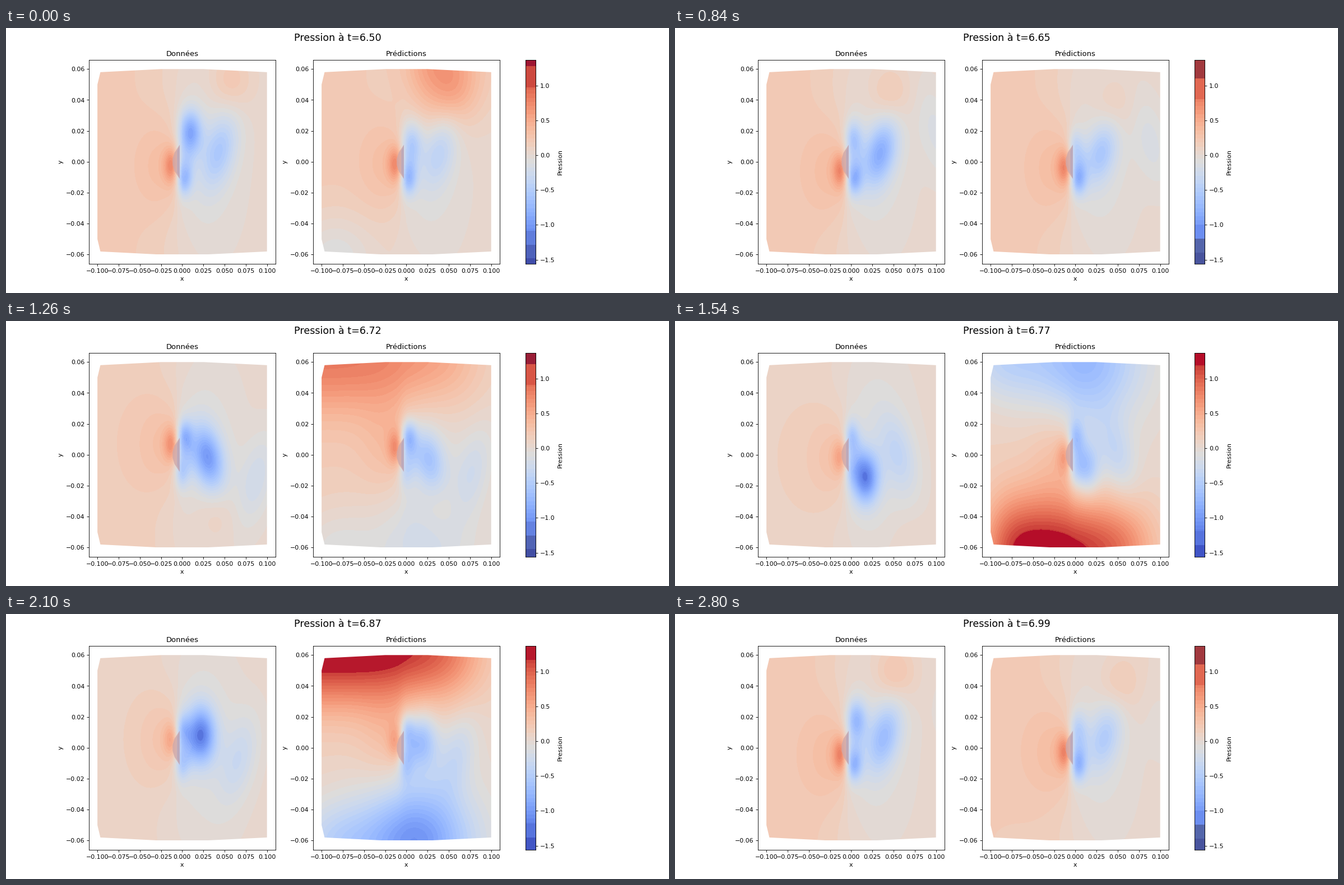
Write a matplotlib script that moves like this. It is 1183 px wide and 473 px high and loops after 2940 ms.

```python
import numpy as np
import matplotlib.pyplot as plt
from matplotlib.animation import FuncAnimation
from matplotlib.patches import Polygon

DPI = 78.86
FRAMES, STEP_MS = 21, 140
CYCLE = 6.8                 # frames per shedding period
VMIN, VMAX, STEP = -1.56, 1.37, 0.0586

X, Y = np.meshgrid(np.linspace(-.1, .1, 304), np.linspace(-.06, .06, 332))


def bump(x, y, sx, sy, ys=Y, shear=0):
    dy = ys - y
    dx = X - x + shear * dy
    return np.exp(-.5 * ((dx / sx) ** 2 + (dy / sy) ** 2))


def pulse(a, center, width):
    return np.exp(-((a - center) / width) ** 2)


def rise(v, soft):
    return 1 / (1 + np.exp(-v / soft))


def vortex(age, ys, pred):
    """Grows on the body's shoulder, is shed, then drifts off and fades."""
    s = max(age - (.87 if pred else .82), 0)
    x = -.001 + .005 * pulse(age, .4, .2) + .06 * s + .028 * s ** 5
    swing = np.cos(2 * np.pi * (max(age, .84) - 1) / .92)
    y = .003 + .010 * swing if pred else .006 + .013 * swing
    if s == 0:
        y = .0115
    young = .65 * pulse(age, .42, .3) * min(age / .15, 1)
    shed = (.55 if pred else 1.1) * pulse(age, 1.15, .28)
    tail = .25 * rise(age - 1.3, .05) * rise(1.9 - age, .03)
    shear = .35 * np.clip((age - 1.2) / .15, 0, 1)
    size = .0065 + .0085 * np.tanh(2 * s), .0075 + .0135 * s
    return -(young + shed + tail) * bump(x, y, *size, ys, shear)


def pocket(age, ys, pred):
    """High pressure left between two shed vortices."""
    d = age - .38
    y = -(.035 if pred else .043) - .07 * d
    return (.2 if pred else .27) * pulse(age, .44, .14) * bump(.045 + .1 * d, y, .018, .014, ys)


def swing_up(age):
    age = (age + .07) % 1 - .07
    return np.sin(np.pi * np.clip((age + .06) / .42, 0, 1))


def swell(age, ys):
    """Boundary error: a red front spreading upstream, blue on the far side."""
    age = (age + .07) % 1 - .07
    k = np.sqrt(swing_up(age))
    front = rise(X - .01 + .9 * age, .013) * rise(.07 - X, .02)
    red = 1.3 * k * front * np.exp(-.5 * ((ys - .062) / .025) ** 2)
    deep = 1.05 * np.sin(np.pi * np.clip(age / .38, 0, 1)) ** 2
    blue = deep * bump(.008, -.062, .048, .025, ys)
    return red - blue - .45 * k * bump(-.085, -.062, .035, .02, ys)


def field(phase, pred):
    beat = np.cos(4 * np.pi * (phase - .43))
    y0 = .0065 * np.sin(2 * np.pi * (phase - .07)) * (.65 if pred else 1)
    v = .03 + (.13 + .06 * beat) * (.5 - .5 * np.tanh(X / .05))
    v -= .17 * bump(.02, 0, .035, .05) + .2 * bump(.005, 0, .008, .009)
    front = (.48 + .1 * beat) * bump(-.012, y0, .007, .008)
    front += .25 * bump(-.018, y0, .024, .022)
    v += front * rise(-.006 - X, .0022)
    for half in (0, 1):
        ys = -Y if half else Y
        p = (phase - .5 * half) % 1
        v += vortex(p, ys, pred) + vortex(p + 1, ys, pred) + pocket(p, ys, pred)
        if pred:
            v += swell(p, ys)
    return v


def paint(v, swing):
    """Fine levels in the middle, a few flat and duller ones at the ends."""
    q = (np.floor(v / STEP) + .5) * STEP
    hi, lo = .8 + .4 * swing, -1 - .2 * swing
    q = np.where(v > hi, hi + (np.floor((v - hi) / .3) + .5) * .3, q)
    q = np.where(v < lo, lo - (np.floor((lo - v) / .2) + .5) * .2, q)
    q = np.clip(q, VMIN, VMAX)
    rgb = plt.cm.coolwarm((q - VMIN) / (VMAX - VMIN))[..., :3]
    dull = .4 * (1 - swing) * np.clip((np.abs(q) - 1.1) / .2, 0, 1)[..., None]
    return rgb * (1 - dull) + dull * np.array([.33, .33, .37])


fig = plt.figure(figsize=(1183.01 / DPI, 473.01 / DPI), dpi=DPI)
title = fig.suptitle("", fontsize=16)


def mirrored(points):
    return points + [(x, -y) for x, y in points[::-1]]


outline = mirrored([(-.1, .05), (-.0965, .058), (-.025, .06), (.025, .06), (.1, .058)])
body = mirrored([(-.003, .011), (-.009, .006), (-.0113, .002)])
edge = mirrored([(-.003, .011), (-.006, .007)])
wake = [(0, .012), (.012, .001), (.001, -.011)]


def fmt(digits):
    return lambda v, _: f"{v:.{digits}f}".replace("-", "\u2212")


def picture(ax, shape, extent):
    return ax.imshow(np.ones(shape + (3,)), extent=extent, origin="lower",
                     aspect="auto", interpolation="nearest")


def panel(x0, name, pred):
    ax = fig.add_axes([x0 / 1183, .11, 332.8 / 1183, .77])
    im = picture(ax, X.shape, (-.1, .1, -.06, .06))
    im.set_clip_path(Polygon(outline, transform=ax.transData))
    if not pred:
        ax.add_patch(Polygon(wake, fc="#bccdfa", alpha=.15, lw=0))
    ax.add_patch(Polygon(body, fc="#d0a8a8", alpha=.8, lw=0))
    ax.add_patch(Polygon(edge, fc="#a5a0c3", alpha=.45, lw=0))
    ax.set(xlim=(-.11, .11), ylim=(-.066, .066), xlabel="x", ylabel="y", title=name)
    ax.set_xticks(np.arange(-4, 5) * .025)
    ax.set_yticks(np.arange(-3, 4) * .02)
    ax.xaxis.set_major_formatter(fmt(3))
    ax.yaxis.set_major_formatter(fmt(2))
    return im


left_im = panel(148, "Données", False)
right_im = panel(548, "Prédictions", True)

bar = fig.add_axes([927.4 / 1183, .11, 18 / 1183, .77])
scale = np.linspace(VMIN, VMAX, 364)[:, None]
bar_im = picture(bar, scale.shape, (0, 1, VMIN, VMAX))
bar.set_xticks([])
bar.set_yticks(np.arange(-3, 3) * .5)
bar.yaxis.tick_right()
bar.yaxis.set_label_position("right")
bar.set_ylabel("Pression")


def update(i):
    phase = i / CYCLE
    swing = max(swing_up(phase), swing_up(phase - .5))
    title.set_text(f"Pression à t={6.504 + .0244 * i:.2f}")
    left_im.set_data(paint(field(phase, False), swing))
    right_im.set_data(paint(field(phase, True), swing))
    bar_im.set_data(paint(scale, swing))
    return title, left_im, right_im, bar_im


anim = FuncAnimation(fig, update, frames=FRAMES, interval=STEP_MS,
                     init_func=lambda: update(0), repeat=True, repeat_delay=0)
plt.show()
```
